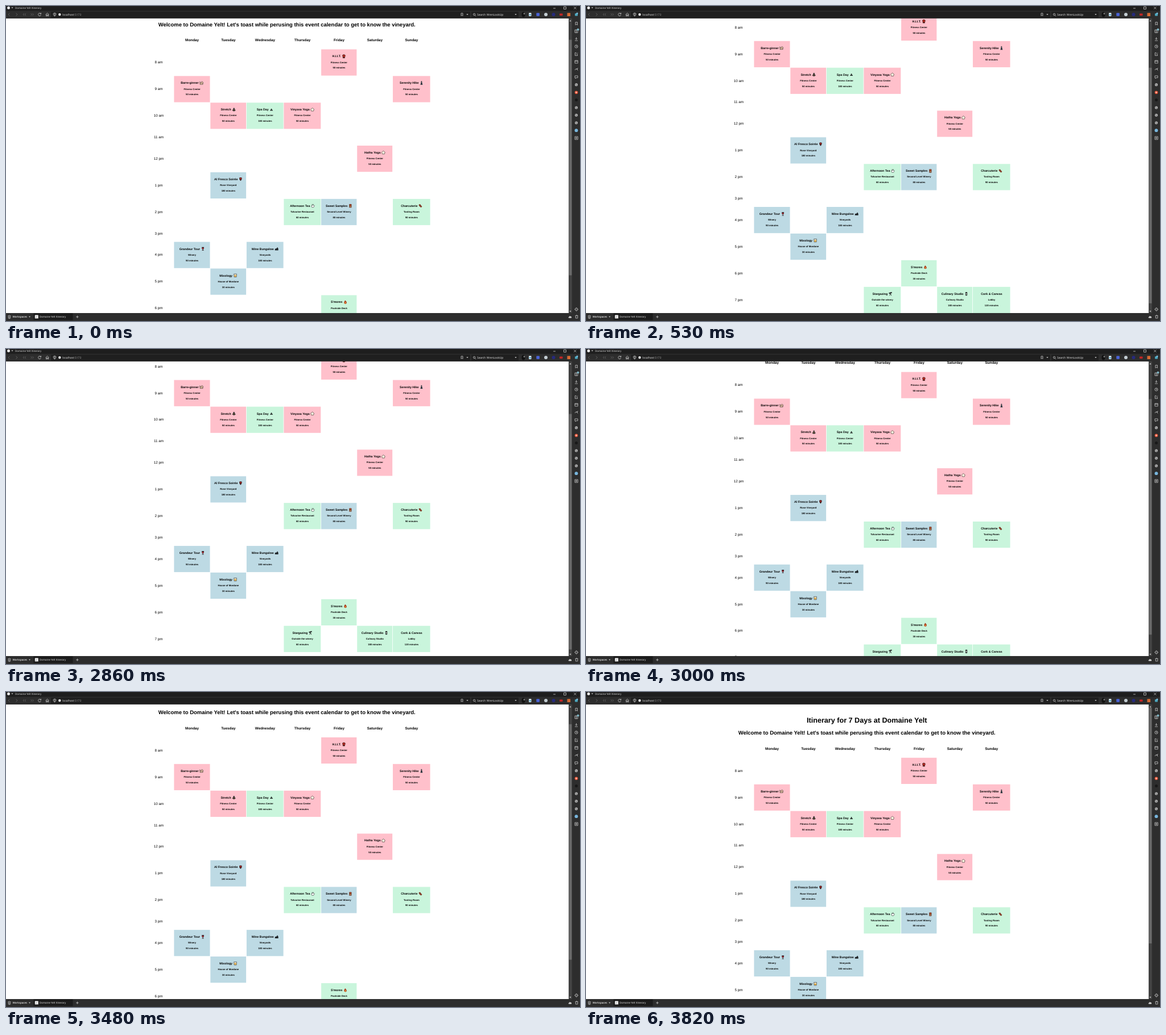
Animation, 1009 px wide and 555 px high, one loop 5.8 s. Source, as an HTML page:

```html
<!DOCTYPE html>
<html lang="en">
<head>
<meta charset="utf-8">
<title>Domaine Yelt Itinerary</title>
<style>
  html, body { margin: 0; width: 100%; height: 100%; overflow: hidden; background: #fff; }
  svg { display: block; }
  text { text-rendering: geometricPrecision; white-space: pre; }
  #page text { font-family: "Liberation Sans", Arial, sans-serif; text-anchor: middle; }
  #page .b { font-weight: bold; }
  #frame text { font-family: "Open Sans", sans-serif; fill: #eee; }
  .line { fill: none; stroke: #ccc; stroke-width: .8; }
  .dim { stroke: #666; }
</style>
</head>
<body>
<svg width="1009" height="555" viewBox="0 0 1009 555">
  <defs><clipPath id="view"><rect y="22" width="989" height="519"/></clipPath></defs>
  <rect width="1009" height="555" fill="#fff"/>
  <g clip-path="url(#view)"><g id="page"></g></g>
  <g id="frame"></g>
  <rect x="989" y="22" width="6" height="519" fill="#424242"/>
  <rect id="thumb" x="989.5" width="5" height="415" fill="#686868"/>
  <path d="M990.5 27l1.5-2 1.5 2zM990.5 537l1.5 2 1.5-2z" fill="#ddd"/>
</svg>
<script>
const page = document.getElementById('page');
const frame = document.getElementById('frame');
const thumb = document.getElementById('thumb');

const text = (x, y, size, str, attrs = '') =>
  `<text x="${x}" y="${y}" font-size="${size}" ${attrs}>${str}</text>`;
const rect = (x, y, w, h, fill, rx = 0) =>
  `<rect x="${x}" y="${y}" width="${w}" height="${h}" rx="${rx}" fill="${fill}"/>`;
const dot = (x, y, r, fill) => `<circle cx="${x}" cy="${y}" r="${r}" fill="${fill}"/>`;
const fill = (d, color, extra = '') => `<path d="${d}" fill="${color}" ${extra}/>`;
const line = (d, cls = '') => `<path d="${d}" class="line ${cls}"/>`;

// Calendar
const OUTLINE = 'stroke="#222" stroke-width=".6"';
const glass = fill('M-2-3H2L1.7 0Q0 1.8-1.7 0zM-.5 1H.5V2.5H1.6V3.2H-1.6V2.5H-.5z', '#2a1a1c');
const lotus = fill('M0-2.9L2.9-.6 1.9 2.6H-1.9L-2.9-.6z', '#fff3df', OUTLINE);
const icons = {
  glove: fill('M-2.4-1Q-2.4-3 0-3 2.7-3 2.6-.6L1.7 1.2V3H-1.6V1z', '#b3261e', OUTLINE) + rect(-1.5, 1.5, 3, 1.3, '#3a1512'),
  shoes: fill('M-3-2L-1.2-.6.6-2.6 2.8-1.2 2.4 2.6H-2.6z', '#f6c9ac', OUTLINE) + fill('M-2.4 1Q0-1 2.2 1', 'none', OUTLINE),
  pose: dot(0, -2, 1.1, '#222') + fill('M-1.3-1.2H1.3L2.8 1.8Q0 4-2.8 1.8z', '#222') + dot(0, .8, .8, '#c99a5a'),
  stones: fill('M-2.7 2Q-2.2.3-1 .3-1.2-1.8 0-1.8 1.2-1.8 1 .3 2.2.3 2.7 2z', '#26302c'),
  lotus,
  hiker: dot(0, -2.2, 1, '#26323a') + fill('M-1-1.2H1L1.3 1 2.1 3.2H-2.1L-1.2 1z', '#26323a'),
  wine: glass + fill('M-1.6-1.5H1.6L1.3-.2Q0 1-1.3-.2z', '#c22a34'),
  rose: fill('M-2.3-2.6L0-3.2 2.3-2.6 2 .5 0 3.2-2 .5z', '#3a1a1a') + dot(0, -1, 1.3, '#b52a2a'),
  teapot: fill('M-2.3-1H2.2Q3.4-.8 2.2 1.2L1.4 2.6H-1.7Q-3.2.6-2.3-1z', '#fff', OUTLINE) + fill('M-1.8-2.4H1.6', 'none', OUTLINE),
  sweets: rect(-2.1, -3, 4.2, 6.2, '#5a2a1c', .6) + rect(-1.3, -2.2, 2.6, 1.8, '#c4512c') + rect(-1.3, .6, 2.6, 1.6, '#d29a6a'),
  meat: fill('M-3-1.8L-.6-3 3.1 1.4 1.2 3-1.6.8z', '#6f2d1d') + fill('M-1.8-1.2L1.6 1.6', 'none', 'stroke="#d06a48" stroke-width=".8"'),
  cabin: fill('M-3 2.6V.4L-1-.8-.4-.2 1.4-2.8 2.9-.2V2.6z', '#1d2226'),
  tumbler: fill('M-2.4-2.6H2.4L2 2.8H-2z', '#f2e6c8', OUTLINE) + rect(-1.9, -.2, 3.8, 2, '#d9a031'),
  flame: fill('M-.4-3.2Q2.7-.8 2.4 1.2 2 3.2 0 3.2-2.4 3-2.3.8-2-.9-1.2-1.4z', '#a5361c') + fill('M0-.6Q1.6 1 .9 2.5H-1Q-1.6 1 0-.6z', '#f09a3a'),
  scope: fill('M-3-1.8L2-3.2 2.8-1.4-2.4.2zM-.4-.6H.4L2 3.2H1.2L0 .8-1.2 3.2H-2z', '#2b302e'),
  jar: rect(-1.7, -3, 3.4, 6.2, '#2c3431', .9) + rect(-.9, -1, 1.8, 2.6, '#b9c4bd')
};

const PINK = '#ffc0cb', BLUE = '#bddae4', GREEN = '#c9f5dc';
const edges = [295.4, 359.3, 422.9, 488.4, 554.1, 617.2, 680, 746.4];
const days = ['Monday', 'Tuesday', 'Wednesday', 'Thursday', 'Friday', 'Saturday', 'Sunday'];
const hours = ['8 am', '9 am', '10 am', '11 am', '12 pm', '1 pm', '2 pm', '3 pm', '4 pm', '5 pm', '6 pm', '7 pm'];
const gym = 'Fitness Center';
const events = [
  [4, 0, 'H.I.I.T.', gym, 50, PINK, 'glove'],
  [0, 1, 'Barre-ginner', gym, 50, PINK, 'shoes'],
  [6, 1, 'Serenity Hike', gym, 50, PINK, 'hiker'],
  [1, 2, 'Stretch', gym, 50, PINK, 'pose'],
  [2, 2, 'Spa Day', gym, 180, GREEN, 'stones'],
  [3, 2, 'Vinyasa Yoga', gym, 50, PINK, 'lotus'],
  [5, 4, 'Hatha Yoga', gym, 50, PINK, 'lotus'],
  [1, 5, 'Al Fresco Soirée', 'Rose Vineyard', 180, BLUE, 'rose'],
  [3, 6, 'Afternoon Tea', 'Tolvarine Restaurant', 60, GREEN, 'teapot'],
  [4, 6, 'Sweet Samples', 'Second Level Winery', 80, BLUE, 'sweets'],
  [6, 6, 'Charcuterie', 'Tasting Room', 90, GREEN, 'meat'],
  [0, 8, 'Grandeur Tour', 'Winery', 90, BLUE, 'wine'],
  [2, 8, 'Wine Bungalow', 'Vineyards', 180, BLUE, 'cabin'],
  [1, 9, 'Mixology', 'House of Mordane', 30, BLUE, 'tumbler'],
  [4, 10, "S'mores", 'Poolside Deck', 30, GREEN, 'flame'],
  [3, 11, 'Stargazing', 'Outside the winery', 60, GREEN, 'scope'],
  [5, 11, 'Culinary Studio', 'Culinary Studio', 180, GREEN, 'jar'],
  [6, 11, 'Cork &amp; Canvas', 'Lobby', 120, GREEN, '']
];

const center = day => (edges[day] + edges[day + 1] - .5) / 2;
const isShort = row => row === 3 || row === 7;
const rowTop = row => 115.8 + 46.95 * row - 18.2 * ((row > 3) + (row > 7));

function eventCell([day, row, title, place, minutes, color, icon]) {
  const x = center(day), y = rowTop(row);
  return rect(edges[day], y, edges[day + 1] - edges[day] - .8, 46.2, color) +
    text(icon ? x - 4.2 : x, y + 14, 5.25, title, `class="b" data-icon="${icon}"`) +
    text(x, y + 24.2, 4.22, place, 'class="b"') +
    text(x, y + 34.1, 4.22, minutes + ' minutes', 'class="b"');
}

page.innerHTML =
  text(493.7, 54.4, 12.61, 'Itinerary for 7 Days at Domaine Yelt', 'class="b"') +
  text(493.7, 75.1, 9.46, "Welcome to Domaine Yelt! Let's toast while perusing this event calendar to get to know the vineyard.", 'class="b"') +
  days.map((day, i) => text(center(i), 101.6, 6.35, day, 'class="b"')).join('') +
  hours.map((hour, i) => text(268.4, rowTop(i) + (isShort(i) ? 15.8 : 24.9), 6.3, hour)).join('') +
  events.map(eventCell).join('');

for (const title of page.querySelectorAll('[data-icon]')) {
  const x = +title.getAttribute('x') + title.getComputedTextLength() / 2 + 5;
  const y = title.getAttribute('y') - 1.8;
  title.insertAdjacentHTML('afterend',
    `<g transform="translate(${x} ${y})">${icons[title.dataset.icon] || ''}</g>`);
}

// Browser window
const globe = y => dot(1002.5, y, 2.6, '#aaa') + line(`M1000.5 ${y - 1}l2 1 1 2`, 'dim');
const caret = (x, y) => fill(`M${x - 1.6} ${y - .8}h3.2l-1.6 2z`, '#ccc');

const topBar =
  rect(0, 0, 1009, 22, '#2d2d2d') + rect(0, 0, 1009, 8.5, '#1e1e1e') +
  rect(79, 10, 737, 10.5, '#1f1f1f', 1) + rect(818, 10, 83, 10.5, '#1f1f1f', 1) +
  dot(4.5, 3.3, 2.5, '#eee') + caret(11, 3) +
  text(16, 5, 4.47, 'Domaine Yelt Itinerary') +
  line('M962 4h4M980.5 1.5h4v4h-4zM998.3 1.5l4 4m0-4l-4 4') +
  line('M6.5 12.5l-2.5 2.5 2.5 2.5M17.5 12.5l2.5 2.5-2.5 2.5M32 13l-2 2 2 2m3-4l-2 2 2 2M43.5 13l2 2-2 2m3-4l2 2-2 2', 'dim') +
  line('M61 13.4a2.5 2.5 0 1 0 .5 2.3M61.5 12v2h-2M69.8 15l2.8-2.6 2.8 2.6M70.6 14.5v3.2h1.3v-2h1.4v2h1.3v-3.2') +
  line('M83.3 13l2.2-.8 2.2.8v2q-.4 2-2.2 2.8-1.8-.8-2.2-2.8zM85.5 12.4v5') +
  dot(94.3, 15, 2.2, '#eee') +
  text(99.2, 16.9, 4.9, 'localhost<tspan fill="#aaa">:5173</tspan>') +
  line('M800 12.7h3v4.6l-1.5-1.4-1.5 1.4z') + caret(811, 14.8) +
  line('M824.3 16.3l1.7 1.6M824.8 14.8a1.7 1.7 0 1 0-3.4 0 1.7 1.7 0 1 0 3.4 0') +
  text(828, 16.9, 4.9, 'Search WrenLookUp') + caret(896, 14.8) +
  '<ellipse cx="909.5" cy="15" rx="3" ry="4.5" fill="#111"/>' + dot(911, 13.5, 1.4, '#777') +
  rect(919, 12, 4.5, 6, '#dce8ec', 1) + rect(919.8, 14.5, 3, 2, '#3f9bc4') +
  rect(932.3, 12.2, 5.6, 5.6, '#4a63d8', 1) +
  dot(949, 15, 3, '#c3cdd2') + dot(962.5, 15, 3, '#262a7c') +
  rect(973, 13.3, 5.6, 3.6, '#c02424', 1) + rect(986.5, 12.2, 5.6, 5.8, '#d66a34', .6) +
  rect(1000, 13, 5, 4.5, '#4aa3b8', .8) + dot(1004, 13, 1.5, '#7cc4e6');

const sidePanel =
  rect(995, 22, 14, 519, '#2d2d2d') +
  line('M1001 28.5h3.4v5l-1.7-1.5-1.7 1.5z') +
  line('M1000 42h5v5h-5zM1002.5 42v5') + dot(1005.5, 41.5, 2, '#7fb6c4') +
  line('M1002.5 55v4m-1.8-1.8l1.8 1.8 1.8-1.8M1000 61h5') +
  line('M1005.1 71.3a2.6 2.6 0 1 0-5.2 0 2.6 2.6 0 1 0 5.2 0M1002.5 69.7v1.8h1.3') +
  line('M1004.5 85v2.3h-4.2v-5h2.4M1002 85.5l3-3') +
  line('M1000 96h5.2v4.8h-5.2zM1000 97.2h5.2') +
  line('M1000 113l2-2.5 1.5 1.5 1.8-3M1003 110l2 3.5') +
  line('M1000 123h5v3.4h-2.6l-1.4 1.5v-1.5h-1z') +
  [138.7, 179, 192.3, 205.8].map(globe).join('') +
  dot(1002.5, 152.2, 2.8, '#e8573a') + dot(1002.5, 152.2, 1, '#fff') +
  dot(1002.5, 165.5, 2.5, '#181818') +
  dot(1002.5, 219.2, 2.9, '#78b5dc') +
  line('M1000 230h5.2v5.2h-5.2zM1001 232.6h3.2M1002.6 231v3.2') +
  line('M1005 534.5a2.3 2.3 0 1 0-4.6 0 2.3 2.3 0 1 0 4.6 0M1003.3 534.5h-1.2M1002.7 531.3v1M1002.7 536.8v1M999.5 534.5h1M1005 534.5h1');

const bottomBar =
  rect(0, 541, 1009, 14, '#2d2d2d') + rect(48.5, 541, 69, 12.5, '#1c1c1c') +
  line('M3.5 546.3l2.4-1.4 2.4 1.4-2.4 1.4zM3.5 548l2.4 1.4 2.4-1.4M3.5 549.5l2.4 1.4 2.4-1.4') +
  text(11.5, 549.4, 4.45, 'Workspaces', 'font-weight="600"') + caret(41.5, 547.6) +
  rect(50.8, 544.6, 6, 6, '#eee', .4) + line('M52.4 548.8l2-2', 'dim') +
  text(59, 549.4, 4.47, 'Domaine Yelt Itinerary') +
  line('M123.2 547.7h4.4M125.4 545.5v4.4') +
  fill('M989.2 549.8q-1.4-1.8.6-2.4.8-2 2.6-.6 2 0 1.8 1.8.2 1.2-1 1.2z', '#ccc') +
  line('M1001.3 546v4h3.6v-4M1000.6 545.6h5M1002.3 544.8h1.6');

frame.innerHTML = topBar + sidePanel + bottomBar;

// Wheel notches: start ms, scroll from, scroll to, phase of first step, steps
const LOOP = 5800, STEP = 70;
const notches = [
  [120, 39.4, 78.8, .43, 3],
  [460, 78.8, 114.7, .27, 4],
  [2860, 114.7, 75.3, .26, 3],
  [3270, 75.3, 35.9, .29, 4],
  [3610, 35.9, 0, .29, 4]
];

function scrollAt(ms) {
  const notch = notches.findLast(([start]) => ms >= start);
  if (!notch) return notches[0][1];
  const [start, from, to, phase, steps] = notch;
  const i = Math.floor((ms - start) / STEP);
  const u = i >= steps - 1 ? 1 : Math.min(1, phase + .31 * i);
  return from + (to - from) * u * u * (3 - 2 * u);
}

function draw(now) {
  const scroll = scrollAt(now % LOOP);
  page.setAttribute('transform', `translate(0 ${-scroll})`);
  thumb.setAttribute('y', 28 + .8 * scroll);
}

const origin = performance.now();
function tick() {
  draw(performance.now() - origin);
  requestAnimationFrame(tick);
}
tick();
</script>
</body>
</html>
```
